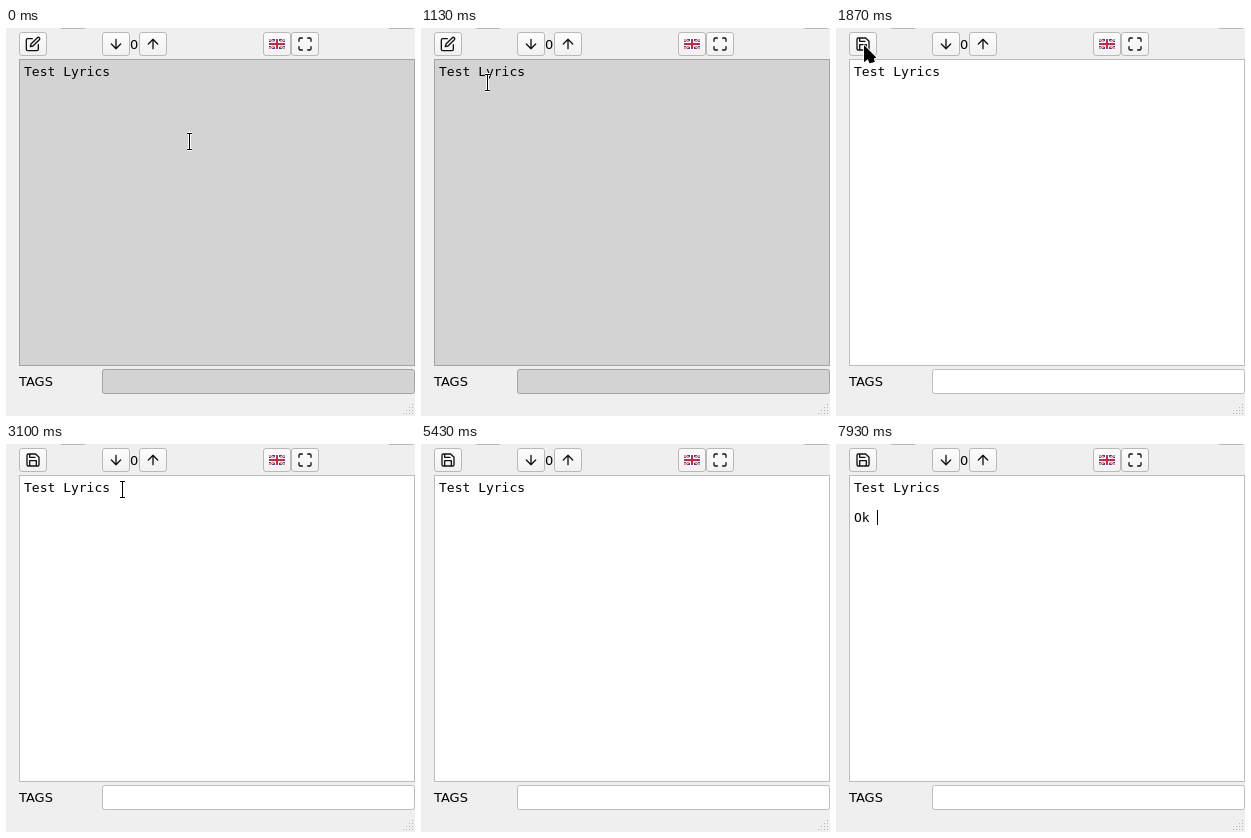
These frames come from a looping animation (409x388 px, 8000 ms). An HTML page:

```html
<!DOCTYPE html>
<html lang="en">
<head>
<meta charset="utf-8">
<title>Lyrics editor</title>
<style>
  html, body { margin: 0; width: 100%; height: 100%; overflow: hidden; background: #efefef; }
  svg { display: block; }
  text { font: 13px "DejaVu Sans", sans-serif; fill: #000; }
  .mono { font-family: "DejaVu Sans Mono", monospace; white-space: pre; }
  .icon { fill: none; stroke: #111; stroke-width: 2; stroke-linecap: round; stroke-linejoin: round; }
  .off .icon { stroke: #777; }
  .off .flag { filter: grayscale(1); opacity: .5; }
  .button { fill: url(#raised); stroke: #b9b9b9; }
  .off .button { fill: url(#flat); stroke: #c0c0c0; }
  .view .field { fill: #d3d3d3; stroke: #a3a3a3; }
  .edit .field { fill: #fff; stroke: #bdbdbd; }

  .view, .edit, .pressed, #pointer, #beam, #arrow, #caret, .o, .k {
    animation: 8s step-end infinite;
  }
  .view { animation-name: view; }
  .edit { animation-name: edit; }
  .pressed { animation-name: pressed; }
  #pointer { animation-name: move; }
  #beam { animation-name: beam; }
  #arrow { animation-name: arrow; }
  #caret { animation-name: caret; }
  .o { animation-name: type-o; }
  .k { animation-name: type-k; }

  @keyframes view { 0% { visibility: visible } 23.375%, 100% { visibility: hidden } }
  @keyframes edit { 0% { visibility: hidden } 23.375%, 100% { visibility: visible } }
  @keyframes pressed {
    0%, 23.375%, 100% { visibility: hidden }
    22.125% { visibility: visible }
  }
  @keyframes type-o { 0% { visibility: hidden } 75.875%, 100% { visibility: visible } }
  @keyframes type-k { 0% { visibility: hidden } 89.625%, 100% { visibility: visible } }

  @keyframes move {
    0% { transform: translate(183px, 113px) }
    8.375% { transform: translate(181px, 112px) }
    8.75% { transform: translate(177px, 110px) }
    9.125% { transform: translate(171px, 108px) }
    9.625% { transform: translate(164px, 105px) }
    10% { transform: translate(158px, 102px) }
    10.375% { transform: translate(155px, 101px) }
    12.5% { transform: translate(139px, 93px) }
    13.375% { transform: translate(103px, 74px) }
    14.125% { transform: translate(66px, 54px) }
    15% { transform: translate(49px, 42px) }
    15.875% { transform: translate(42px, 35px) }
    16.625% { transform: translate(38px, 29px) }
    17.5% { transform: translate(35px, 25px) }
    18.375% { transform: translate(32px, 21px) }
    19.125% { transform: translate(30px, 19px) }
    20% { transform: translate(28px, 17px) }
    24.625% { transform: translate(33px, 20px) }
    25.875% { transform: translate(46px, 26px) }
    26.625% { transform: translate(64px, 33px) }
    27.5% { transform: translate(84px, 39px) }
    28.375% { transform: translate(105px, 43px) }
    30% { transform: translate(116px, 45px) }
    55% { transform: translate(116px, 27px) }
    55.875%, 100% { transform: translate(117px, 8px) }
  }
  @keyframes beam {
    0%, 26.625% { visibility: visible }
    16.625%, 55%, 100% { visibility: hidden }
  }
  @keyframes arrow {
    0%, 26.625%, 57.125%, 100% { visibility: hidden }
    16.625%, 55% { visibility: visible }
  }
  @keyframes caret {
    0%, 38.75%, 45.875%, 52.875%, 67.875%, 90.875% { visibility: hidden }
    31.625%, 42.875%, 47.125%, 60.375%, 82.875%, 98.375%, 100% { visibility: visible }
    0% { transform: translate(104px, 36px) }
    42.875% { transform: translate(18px, 51px) }
    47.125% { transform: translate(18px, 66px) }
    82.875% { transform: translate(26px, 66px) }
    89.625% { transform: translate(34px, 66px) }
    99.125%, 100% { transform: translate(41px, 66px) }
  }
</style>
</head>
<body>
<svg width="409" height="388" viewBox="0 0 409 388">
  <defs>
    <linearGradient id="raised" x2="0" y2="1">
      <stop stop-color="#fdfdfd"/><stop offset="1" stop-color="#f1f1f1"/>
    </linearGradient>
    <linearGradient id="flat" x2="0" y2="1">
      <stop stop-color="#d8d8d8"/><stop offset="1" stop-color="#e6e6e6"/>
    </linearGradient>
    <rect id="key" x=".5" y=".5" width="27" height="23" rx="2.5"/>
    <g id="fields">
      <rect x="13.5" y="31.5" width="395" height="306"/>
      <rect x="96.5" y="341.5" width="312" height="24" rx="2"/>
    </g>
    <path id="down" d="M12 5v14M19 12l-7 7-7-7"/>
    <path id="pencil" d="M11 4H4a2 2 0 0 0-2 2v14a2 2 0 0 0 2 2h14a2 2 0 0 0 2-2v-7M18.5 2.5a2.12 2.12 0 0 1 3 3L12 15l-4 1 1-4z"/>
    <path id="disk" d="M19 21H5a2 2 0 0 1-2-2V5a2 2 0 0 1 2-2h11l5 5v11a2 2 0 0 1-2 2zM17 21v-8H7v8M7 3v5h8"/>
    <path id="corners" d="M8 3H5a2 2 0 0 0-2 2v3m18 0V5a2 2 0 0 0-2-2h-3m0 18h3a2 2 0 0 0 2-2v-3M3 16v3a2 2 0 0 0 2 2h3"/>
    <clipPath id="cloth"><rect width="16" height="10"/></clipPath>
    <g id="flag" clip-path="url(#cloth)" fill="none">
      <rect width="16" height="10" fill="#33478f"/>
      <path d="M0 0l16 10M16 0L0 10" stroke="#fff" stroke-width="2.2"/>
      <path d="M0 0l16 10M16 0L0 10" stroke="#d8203c" stroke-width=".8"/>
      <path d="M8 0v10M0 5h16" stroke="#fff" stroke-width="4"/>
      <path d="M8 0v10M0 5h16" stroke="#d8203c" stroke-width="2"/>
    </g>
    <g id="tools">
      <use href="#key" class="button" x="96" y="4"/>
      <use href="#key" class="button" x="133" y="4"/>
      <use href="#key" class="button" x="257" y="4"/>
      <use href="#down" class="icon" transform="translate(102 8) scale(.667)"/>
      <use href="#down" class="icon" transform="translate(139 24) scale(.667 -.667)"/>
      <use href="#flag" class="flag" x="263" y="11"/>
    </g>
    <path id="beam-line" d="M-2 -7.5h5M.5 -7.5v16M-2 8.5h5"/>
  </defs>

  <rect width="409" height="388" fill="#efefef"/>
  <use href="#key" class="button" x="53" y="-23"/>
  <use href="#key" class="button" x="381" y="-23"/>
  <use href="#key" class="button" x="13" y="4"/>
  <use href="#key" class="button" x="285" y="4"/>
  <use href="#corners" class="icon" transform="translate(291 8) scale(.667)"/>
  <use href="#key" class="pressed" x="13" y="4" fill="#d6d6d6" stroke="#b5b5b5"/>

  <g class="view">
    <use href="#fields" class="field"/>
    <use href="#tools"/>
    <use href="#pencil" class="icon" transform="translate(19 8) scale(.667)"/>
  </g>
  <g class="edit off">
    <use href="#fields" class="field"/>
    <use href="#tools"/>
  </g>
  <g class="edit">
    <use href="#disk" class="icon" transform="translate(19 8) scale(.667)"/>
  </g>

  <text x="124" y="21">0</text>
  <text x="13" y="358">TAGS</text>
  <text class="mono" x="18" y="48">Test Lyrics</text>
  <text class="mono" x="18" y="78"><tspan class="o">O</tspan><tspan class="k">k</tspan></text>
  <path d="M397 385.5h11M400 382.5h8M403 379.5h5M406 376.5h2" stroke="#b4b4b4" stroke-dasharray="1 2"/>
  <rect id="caret" width="1" height="15"/>

  <g id="pointer">
    <g id="beam" fill="none">
      <use href="#beam-line" stroke="#fff" stroke-width="3"/>
      <use href="#beam-line" stroke="#000"/>
    </g>
    <path id="arrow" d="M0 0V17.2L3.8 14.2 5.6 18.3 10.8 17 9.8 13.6 12.3 12.4z"
      fill="#000" stroke="#fff" stroke-width="1.6" stroke-linejoin="round" paint-order="stroke"/>
  </g>
</svg>
</body>
</html>
```
